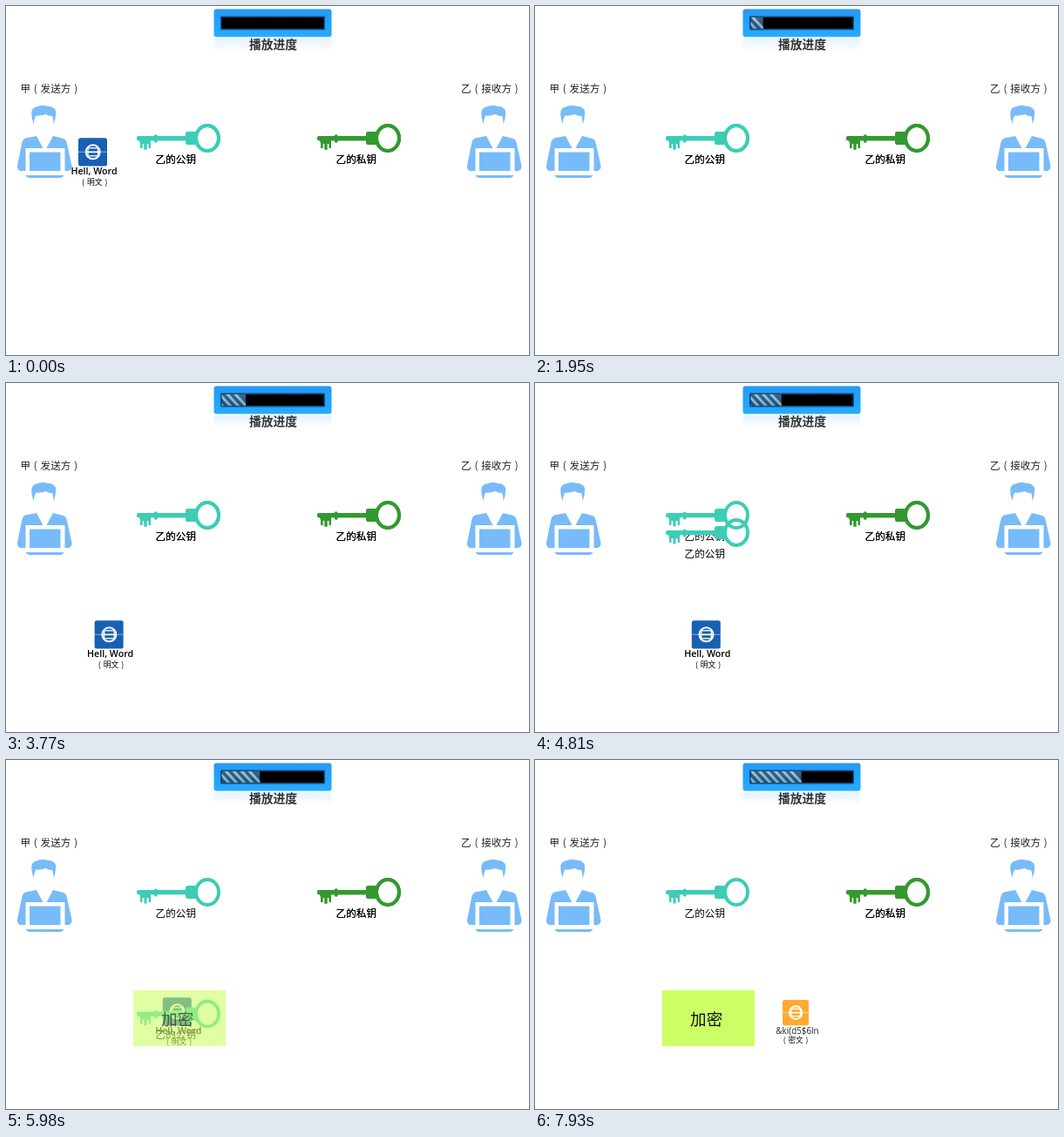
An HTML page with a canvas for the animation above (8000 ms loop, 600 by 400 pixels).

```html
<!DOCTYPE html>
<html lang="zh-CN">
<head>
<meta charset="utf-8">
<title>公钥加密</title>
<style>
html, body { margin: 0; width: 100%; height: 100%; overflow: hidden; background: #fff; }
canvas { display: block; width: 600px; height: 400px; }
</style>
</head>
<body>
<canvas id="stage" width="600" height="400"></canvas>
<script>
const ctx = document.getElementById('stage').getContext('2d');
const LOOP = 8000, STEP = 130;
const CJK = '"Noto Sans CJK SC", "Noto Sans CJK", sans-serif';
const LATIN = '"Open Sans", "Noto Sans", sans-serif';
const SKY = '#78bbf9', TEAL = '#3ccdb5', GREEN = '#33992f';

const clamp = v => Math.max(0, Math.min(1, v));
const ramp = (t, start, length) => clamp((t - start) / length);
const within = (t, a, b) => t >= a && t < b;

function rect(x, y, w, h, color, r = 0) {
  ctx.fillStyle = color;
  ctx.beginPath();
  ctx.roundRect(x, y, w, h, r);
  ctx.fill();
}

function shape(d, color) {
  ctx.fillStyle = color;
  ctx.fill(new Path2D(d));
}

function text(str, x, y, size, { font = CJK, weight = 400, color = '#000', align = 'left' } = {}) {
  ctx.font = `${weight} ${size}px ${font}`;
  ctx.fillStyle = color;
  ctx.textAlign = align;
  ctx.fillText(str, x, y);
}

// every character, brackets too, is centred in a square cell
function cells(str, x, y, size, style) {
  [...str].forEach((c, i) => text(c, x + (i + 0.5) * size, y, size, { ...style, align: 'center' }));
}

function at(x, y, draw) {
  ctx.save();
  ctx.translate(x, y);
  draw();
  ctx.restore();
}

function faded(alpha, draw) {
  ctx.save();
  ctx.globalAlpha = alpha;
  draw();
  ctx.restore();
}

function gradient(y0, y1, ...stops) {
  const g = ctx.createLinearGradient(0, y0, 0, y1);
  stops.forEach((c, i) => g.addColorStop(i / (stops.length - 1), c));
  return g;
}

function progress(t) {
  rect(238.5, 37, 135, 15, gradient(37, 52, 'rgba(60,170,255,.14)', 'rgba(60,170,255,0)'), 3);
  rect(238.5, 3.5, 135, 32, gradient(3, 36, '#2a98f2', '#1ea3ff', '#2aabff'), 3);
  rect(246, 11.5, 120, 16, '#0c4f86', 1);
  rect(247.5, 13, 117, 13, '#000');
  const width = t * 0.00735;
  if (width > 0) {
    ctx.save();
    ctx.beginPath();
    ctx.rect(247.5, 13, width, 13);
    ctx.clip();
    rect(247.5, 13, width, 13, gradient(13, 26, '#34688c', '#1f4f75'));
    // stripes ride with the leading edge
    const lead = 247.5 + width;
    for (let x = lead - 5; x > 225; x -= 9) {
      shape(`M${x - 9} 13h4l12 13h-4z`, gradient(13, 26, '#a9c8da', '#7fa7bf'));
    }
    ctx.restore();
  }
  text('播放进度', 306.5, 49, 13.8, { weight: 900, color: '#333', align: 'center' });
}

function person(x) {
  at(x, 0, () => {
    shape('M32 135.5Q28.5 127 29.5 120.5Q31 116 35.5 115.5Q42 113 48 115Q53 114.5 55 117.5' +
      'Q58 119 57 125Q57 130 54.5 135.5Q54.5 129 53 126Q48 126.5 46 124Q39 126.5 34.5 125.5Q32 129 32 135.5z', SKY);
    shape('M22 151.5L35 149L42.5 163H22.5V189H16Q12.5 187 13 183L18.5 156Q19.5 152.5 22 151.5z', SKY);
    shape('M54 149L66 152Q68.5 153 69.5 156L75.5 183Q76 187.5 72 189H67.5V163H46.5z', SKY);
    rect(27, 167.5, 35.5, 21.5, SKY);
    shape('M22.5 194H66.5Q65 197 62.5 197H26.5Q24 197 22.5 194z', SKY);
  });
}

function key(x, y, color, label) {
  at(x, y, () => {
    rect(0, 14, 60, 5.2, color, 2.5);
    shape('M3 18H16V28H13.7V23H11.5V29.5H8.5V23H6.5V28H4V22z', color);
    rect(20, 12.5, 3.5, 9, color, 1.5);
    rect(56, 9, 13, 15, color, 3);
    ctx.strokeStyle = color;
    ctx.lineWidth = 4;
    ctx.beginPath();
    ctx.ellipse(81, 16.5, 13, 14.5, 0, 0, 2 * Math.PI);
    ctx.stroke();
    text(label, 21.6, 44.8, 11.6);
  });
}

function icon(size, color) {
  const s = size / 33;
  ctx.save();
  ctx.scale(s, s);
  rect(0, 0, 33, 32.3, color, 2.5);
  rect(0, 15.5, 33, 1, 'rgba(255,255,255,.5)');
  ctx.fillStyle = color;
  ctx.strokeStyle = '#fff';
  ctx.lineWidth = 2;
  ctx.beginPath();
  ctx.arc(16.7, 16, 8, 0, 2 * Math.PI);
  ctx.fill();
  ctx.stroke();
  ctx.lineWidth = 1.3;
  ctx.strokeRect(11, 11.5, 11.5, 9);
  rect(9.5, 15.2, 14.5, 1.7, '#fff');
  ctx.restore();
}

function plainDoc(t) {
  if (within(t, 845, 1300) || within(t, 1755, 2210)) return;
  const down = ramp(t, 2210, 910), across = ramp(t, 3640, 910);
  at(83 + 5.6 * down + 91.2 * across, 151.3 + 121 * down, () => {
    icon(33, '#1760b2');
    text('Hell, Word', 18, 42, 10.7, { font: LATIN, weight: 600, align: 'center' });
    cells('(明文)', 1.2, 53.8, 8.8, { weight: 500 });
  });
}

function cipherDoc(t) {
  faded(ramp(t, 7020, 650), () => at(284, 275, () => {
    icon(30, '#ffaa30');
    text('&ki(d5$6ln', 17, 38.6, 9.9, { font: LATIN, color: '#222', align: 'center' });
    cells('(密文)', -2.2, 49.2, 8.6, { color: '#111' });
  }));
}

function encryptBox(t) {
  faded(ramp(t, 5590, 650), () => {
    rect(146, 264, 106, 64, '#ccff66');
    text('加密', 196.7, 303.5, 18.6, { color: '#111', align: 'center' });
  });
}

function draw(t) {
  rect(0, 0, 600, 400, '#fff');
  progress(t);
  cells('甲(发送方)', 16.4, 99.3, 11.6, { color: '#222' });
  cells('乙(接收方)', 522, 99.3, 11.6, { color: '#222' });
  person(0);
  person(516);
  key(150, 135, TEAL, '乙的公钥');
  key(357, 135, GREEN, '乙的私钥');
  key(357, 135, GREEN, '乙的私钥');
  plainDoc(t);
  // the copy of the public key rests on its twin until it moves
  key(150, 135 + 139.5 * ramp(t, 4680, 910), TEAL, '乙的公钥');
  encryptBox(t);
  cipherDoc(t);
}

const origin = performance.now();
function frame() {
  const t = (performance.now() - origin) % LOOP;
  draw(t < 2 * STEP ? 0 : Math.floor(t / STEP) * STEP);
  requestAnimationFrame(frame);
}
frame();
</script>
</body>
</html>
```
